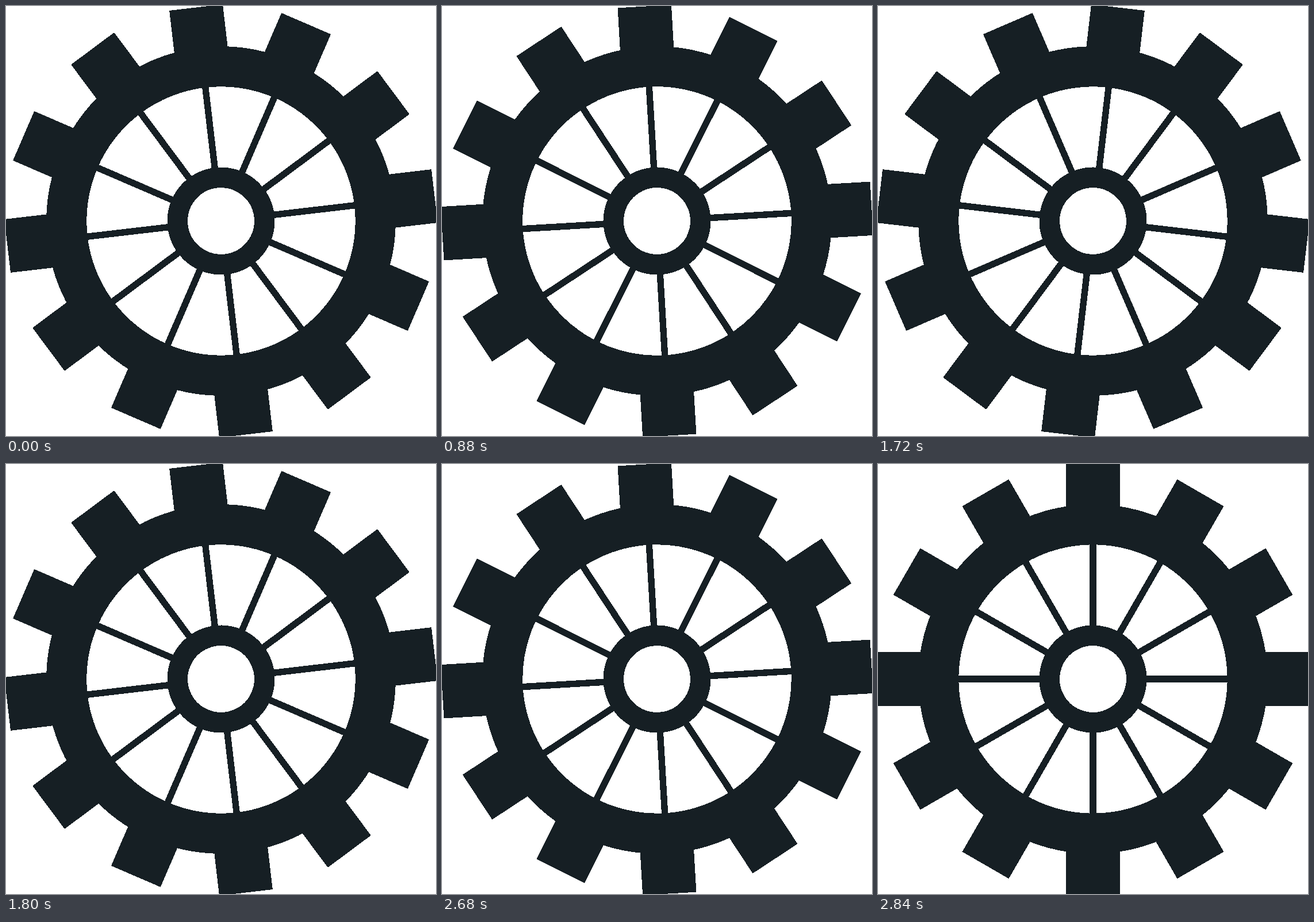
Write an HTML page that moves like this. It is 748x748 px and loops after 2880 ms.

```html
<!DOCTYPE html>
<html lang="en">
<head>
<meta charset="utf-8">
<title>Cogwheel</title>
<style>
  html, body { margin: 0; width: 100%; height: 100%; overflow: hidden; background: #fff; }
  svg { display: block; width: 100%; height: 100%; shape-rendering: crispEdges; }
  circle { fill: none; stroke: #161f24; }
  rect { fill: #161f24; }
</style>
</head>
<body>
<svg viewBox="-374 -374 748 748">
  <g id="wheel">
    <circle r="268.8" stroke-width="70.2"/>
    <circle r="75.7" stroke-width="35.6"/>
  </g>
</svg>
<script>
const wheel = document.getElementById('wheel');
const LOOP = 2880, TICK = 40, STEP = -20 / 3;

// Three pauses, each followed by a short run of equal turns.
const runs = [
  { start: 760, count: 6 },
  { start: 1720, count: 6 },
  { start: 2680, count: 5 }
];

function addBar(angle, width, inner, outer) {
  const bar = document.createElementNS('http://www.w3.org/2000/svg', 'rect');
  const attrs = {
    x: -width / 2, y: -outer, width, height: outer - inner,
    transform: `rotate(${angle})`
  };
  for (const key in attrs) bar.setAttribute(key, attrs[key]);
  wheel.append(bar);
}

for (let angle = 0; angle < 360; angle += 30) {
  addBar(angle, 93.5, 270, 374);
  addBar(angle, 11.4, 80, 250);
}

function turnsAt(time) {
  return runs.reduce((sum, { start, count }) => {
    const done = Math.floor((time - start) / TICK) + 1;
    return sum + Math.max(0, Math.min(count, done));
  }, 1);
}

function draw(now) {
  wheel.setAttribute('transform', `rotate(${turnsAt(now % LOOP) * STEP})`);
}

let begin;
function frame(now) {
  begin ??= now;
  draw(now - begin);
  requestAnimationFrame(frame);
}
draw(0);
requestAnimationFrame(frame);
</script>
</body>
</html>
```
